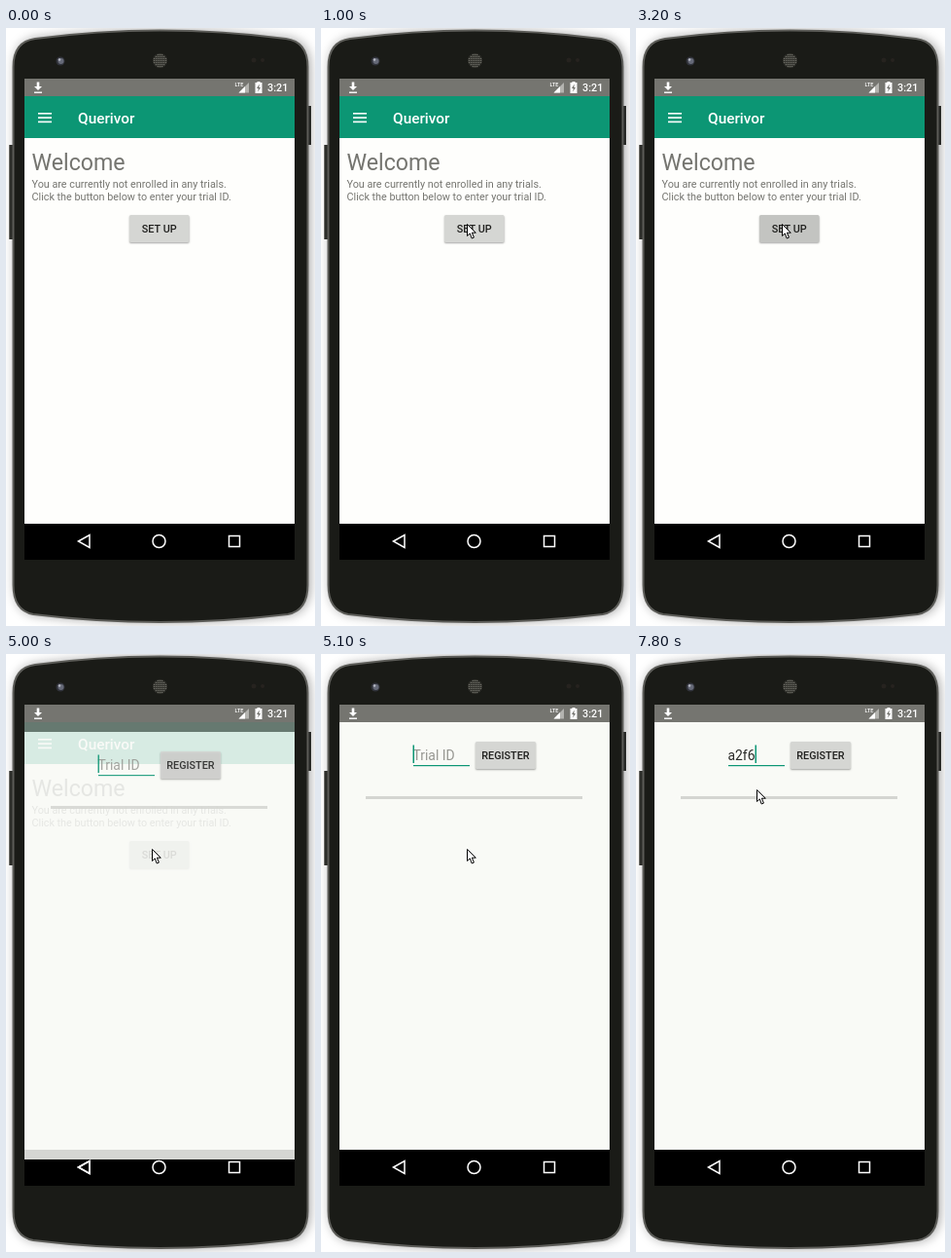
An HTML page with a canvas for the animation above (8 s loop, 318 by 614 pixels).

```html
<!DOCTYPE html>
<html lang="en">
<head>
<meta charset="utf-8">
<title>Trial sign-up</title>
<style>
  html, body { margin: 0; width: 100%; height: 100%; overflow: hidden; background: #fff; }
  canvas { display: block; width: 318px; height: 614px; }
</style>
</head>
<body>
<canvas id="stage" width="318" height="614"></canvas>
<script>
const ctx = document.getElementById('stage').getContext('2d');
const LOOP = 8000;
const GREEN = '#0c9674', GREY = '#757570', PAPER = '#f9faf6';

// [start ms, value] lists; each value holds until the next one
const POINTER = [
  [0, null], [700, [117, 189]], [800, [133, 195]], [900, [144, 199]], [1000, [150, 201]],
  [4600, [150, 200]], [5400, [148, 195]], [5600, [124, 138]], [7800, [124, 139]]
];
const TYPED = [[0, ''], [6200, 'a'], [6600, 'a2'], [7400, 'a2f'], [7600, 'a2f6']];
const CARET = [[0, true], [5400, false], [5800, true], [7100, false], [7400, true]];

const at = (track, t) => track.reduce((v, [start, value]) => t >= start ? value : v, track[0][1]);

function rect(x, y, w, h, color) {
  ctx.fillStyle = color;
  ctx.fillRect(x, y, w, h);
}

function disc(x, y, r, color) {
  ctx.fillStyle = color;
  ctx.beginPath();
  ctx.arc(x, y, r, 0, Math.PI * 2);
  ctx.fill();
}

function polygon(points, fill, stroke, width = 1) {
  ctx.beginPath();
  points.forEach(([x, y]) => ctx.lineTo(x, y));
  ctx.closePath();
  if (fill) { ctx.fillStyle = fill; ctx.fill(); }
  if (stroke) { ctx.strokeStyle = stroke; ctx.lineWidth = width; ctx.stroke(); }
}

function text(str, x, y, size, color, weight = 400) {
  ctx.font = `${weight} ${size}px Roboto, sans-serif`;
  ctx.fillStyle = color;
  ctx.fillText(str, x, y);
}

function button(x, y, w, h, color, label, labelX) {
  ctx.save();
  ctx.shadowColor = 'rgba(0,0,0,.35)';
  ctx.shadowBlur = 2;
  ctx.shadowOffsetY = 1;
  ctx.fillStyle = color;
  ctx.beginPath();
  ctx.roundRect(x, y, w, h, 1.5);
  ctx.fill();
  ctx.restore();
  text(label, labelX, y + 18, 10.8, '#20201e', 500);
}

function bodyPath() {
  ctx.beginPath();
  ctx.moveTo(7.5, 40);
  ctx.quadraticCurveTo(7.5, 14, 30, 11);
  ctx.quadraticCurveTo(158, -6, 288, 11);
  ctx.quadraticCurveTo(310.5, 14, 310.5, 40);
  ctx.lineTo(310.5, 572);
  ctx.quadraticCurveTo(310.5, 598, 290, 602);
  ctx.quadraticCurveTo(158, 618, 28, 602);
  ctx.quadraticCurveTo(7.5, 598, 7.5, 572);
  ctx.closePath();
}

function drawPhone() {
  rect(0, 0, 318, 614, '#fff');
  rect(3, 120, 5, 97, '#30312d');
  rect(3, 120, 1, 97, '#6c6c68');
  rect(310, 80, 4, 40, '#30312d');

  ctx.save();
  ctx.shadowColor = 'rgba(0,0,0,.4)';
  ctx.shadowBlur = 12;
  ctx.shadowOffsetX = 2;
  ctx.fillStyle = '#1a1b17';
  bodyPath();
  ctx.fill();
  ctx.restore();
  bodyPath();
  ctx.strokeStyle = '#5c5c58';
  ctx.lineWidth = 2;
  ctx.stroke();

  disc(56, 34, 4.5, '#30323a');
  disc(56.5, 34, 3, '#666a78');
  disc(55, 32.5, 1.3, '#b4b7c2');
  disc(158.5, 33.5, 7.5, '#34342f');
  for (let y = -6; y <= 6; y += 2)
    for (let x = -6; x <= 6; x += 2)
      if (Math.hypot(x, y) < 7) rect(158 + x, 33 + y, 1, 1, '#77776f');
  disc(255, 33, 2.5, '#26231f');
  disc(264, 33, 2, '#26231f');
}

function drawStatusBar() {
  rect(19, 52, 278, 18, GREY);
  rect(31.7, 55.5, 2.6, 5, '#fff');
  polygon([[29, 60], [37, 60], [33, 64]], '#fff');
  rect(29, 65.5, 8, 1.4, '#fff');
  text('LTE', 235.5, 60, 5.5, '#fff', 500);
  polygon([[250, 56], [250, 66.5], [239.5, 66.5]], '#b4b4b0');
  polygon([[246, 60], [246, 66.5], [239.5, 66.5]], '#fff');
  rect(256.5, 56, 7, 11, '#fff');
  rect(258.5, 55, 3, 1, '#fff');
  polygon([[260.7, 57.5], [258, 62], [259.7, 62], [259.2, 65.5], [262, 61], [260.4, 61]], GREY);
  text('3:21', 269, 65, 10.8, '#fff', 500);
}

function drawNavBar() {
  rect(19, 509, 278, 37, '#000');
  polygon([[74.5, 527], [86, 520.5], [86, 533.5]], null, '#fff', 1.5);
  ctx.beginPath();
  ctx.arc(157.5, 527, 6.5, 0, Math.PI * 2);
  ctx.stroke();
  ctx.strokeRect(229.5, 521.5, 11, 11);
}

function drawWelcome(pressed) {
  rect(19, 70, 278, 439, '#fefefc');
  rect(19, 70, 278, 43, GREEN);
  for (const y of [87, 91.3, 95.6]) rect(33, y, 14, 1.6, '#fff');
  text('Querivor', 74, 98, 15.4, '#fff', 500);
  text('Welcome', 26.5, 146, 23.2, GREY);
  text('You are currently not enrolled in any trials.', 26.5, 164, 10.8, GREY);
  text('Click the button below to enter your trial ID.', 26.5, 176.7, 10.8, GREY);
  button(127, 192, 61.5, 28, pressed ? '#c3c4c1' : '#d5d6d3', 'SET UP', 139.8);
}

function drawForm(t) {
  const typed = at(TYPED, t);
  rect(19, 70, 278, 439, PAPER);
  text(typed || 'Trial ID', 94.5, 108.5, 13.9, typed ? '#2a2a28' : '#969691');
  if (at(CARET, t)) {
    const end = typed ? ctx.measureText(typed).width : 0;
    rect(94.5 + end, 93.5, 1.5, 18.5, GREEN);
  }
  rect(95, 114, 58, 1.2, GREEN);
  button(159, 90, 62, 28, '#d5d6d3', 'REGISTER', 165.3);
  rect(46, 146, 223, 3, '#d4d5d1');
}

function drawPointer([x, y]) {
  const shape = [[.5, .5], [.5, 12.5], [3.3, 9.9], [5.2, 15], [7.4, 14.1], [5.4, 9.2], [9.3, 9.2]];
  polygon(shape.map(([dx, dy]) => [x + dx, y + dy]), '#fff', '#000');
}

function drawEntering(t) {
  ctx.save();
  ctx.globalAlpha = .86;
  ctx.translate(0, 10);
  rect(19, 60, 278, 10, GREY);
  drawForm(t);
  ctx.restore();
}

function draw(t) {
  drawPhone();
  drawStatusBar();
  drawNavBar();
  if (t < 5100) drawWelcome(t >= 3200);
  if (t >= 5100) drawForm(t);
  else if (t >= 5000) {
    drawEntering(t);
    // system icons stay above the incoming page
    polygon([[74.5, 527], [86, 520.5], [86, 533.5]], null, '#fff', 1.5);
  }
  const pointer = at(POINTER, t);
  if (pointer) drawPointer(pointer);
}

const origin = performance.now();
function tick() {
  draw((performance.now() - origin) % LOOP);
  requestAnimationFrame(tick);
}
tick();
</script>
</body>
</html>
```
